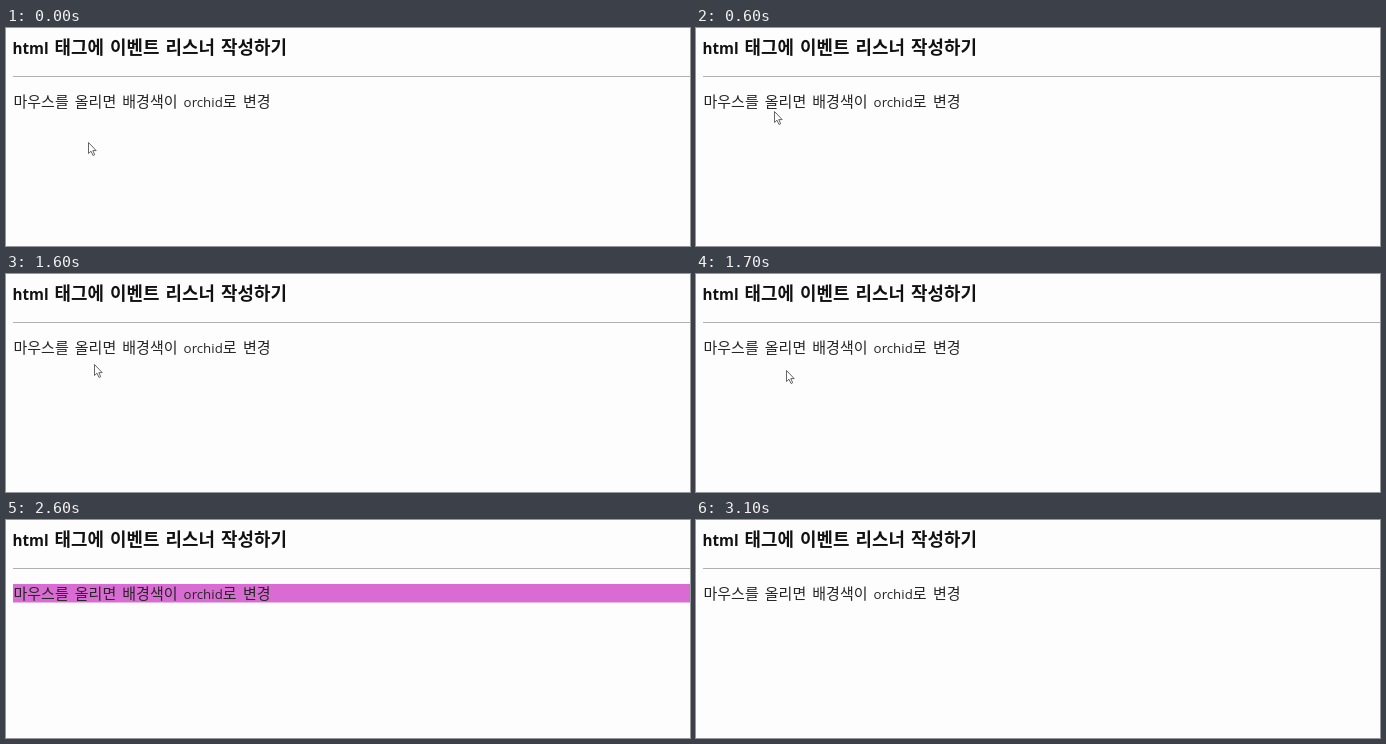
Write an HTML page that moves like this. It is 684 px wide and 218 px high and loops after 3200 ms.

```html
<!DOCTYPE html>
<html lang="ko">
<head>
<meta charset="utf-8">
<style>
  html, body { margin: 0; width: 100%; height: 100%; overflow: hidden; background: #fdfdfd; }
  svg { display: block; }
  text { font-family: "Noto Sans CJK KR", sans-serif; }
  .latin { font-family: "Open Sans", sans-serif; }
  #title { font-size: 17.9px; font-weight: 700; fill: #111; }
  #title .latin { font-size: 15.2px; }
  #line { font-size: 15px; fill: #262626; }
  #line .latin { font-size: 13.3px; }
</style>
</head>
<body>
<svg width="684" height="218" viewBox="0 0 684 218">
  <rect x="7" y="48" width="677" height="1" fill="#b0b0b0"/>
  <rect id="band" x="7" y="64" width="677" height="18.5" fill="#d86cd2"/>
  <text id="title" y="26"><tspan class="latin" x="6.5">html</tspan> <tspan x="48.5">태그에</tspan> <tspan x="104">이벤트</tspan> <tspan x="159.5">리스너</tspan> <tspan x="215">작성하기</tspan></text>
  <text id="line" y="79"><tspan x="7.5">마우스를</tspan> <tspan x="68.8">올리면</tspan> <tspan x="116.3">배경색이</tspan> <tspan class="latin" x="177.6">orchid</tspan><tspan>로</tspan> <tspan x="237">변경</tspan></text>
  <path id="arrow" d="M.5 .5V11.5L3 9.2L5 13.5L6.7 12.7L4.8 8.6H8.2Z" fill="#fff" stroke="#555" stroke-width=".9"/>
  <path id="beam" d="M-1.5 -4.5H1.5M0 -4.5V4.5M-1.5 4.5H1.5" fill="none" stroke="#5a2a5c" stroke-width=".9"/>
</svg>
<script>
const LOOP = 3200, STEP = 100;
const $ = id => document.getElementById(id);
const show = (el, on) => el.style.display = on ? '' : 'none';

// time, x, y of the pointer tip
const path = [
  [0, 82, 114], [600, 78, 83], [700, 84, 77], [900, 85, 78], [1400, 85, 78],
  [1500, 86, 84], [1700, 90, 96], [1800, 112, 126], [1900, 142, 144],
  [2000, 286, 194], [2100, 480, 204], [2200, 620, 206], [2300, 700, 230]
];

function pointer(t) {
  const i = path.findIndex(p => p[0] > t);
  if (i < 0) return path[path.length - 1].slice(1);
  const [t0, x0, y0] = path[i - 1], [t1, x1, y1] = path[i];
  const k = (t - t0) / (t1 - t0);
  return [x0 + (x1 - x0) * k, y0 + (y1 - y0) * k];
}

function draw(now) {
  const t = Math.floor(now % LOOP / STEP) * STEP;
  const over = t >= 700 && t < 1500;
  const [x, y] = pointer(t).map(Math.round);
  show($('band'), over || t >= 2600 && t < 2700);
  show($('beam'), over);
  show($('arrow'), !over && t < 2300);
  for (const id of ['beam', 'arrow'])
    $(id).setAttribute('transform', `translate(${x} ${y})`);
}

const start = performance.now();
function tick() {
  draw(performance.now() - start);
  requestAnimationFrame(tick);
}
tick();
</script>
</body>
</html>
```
